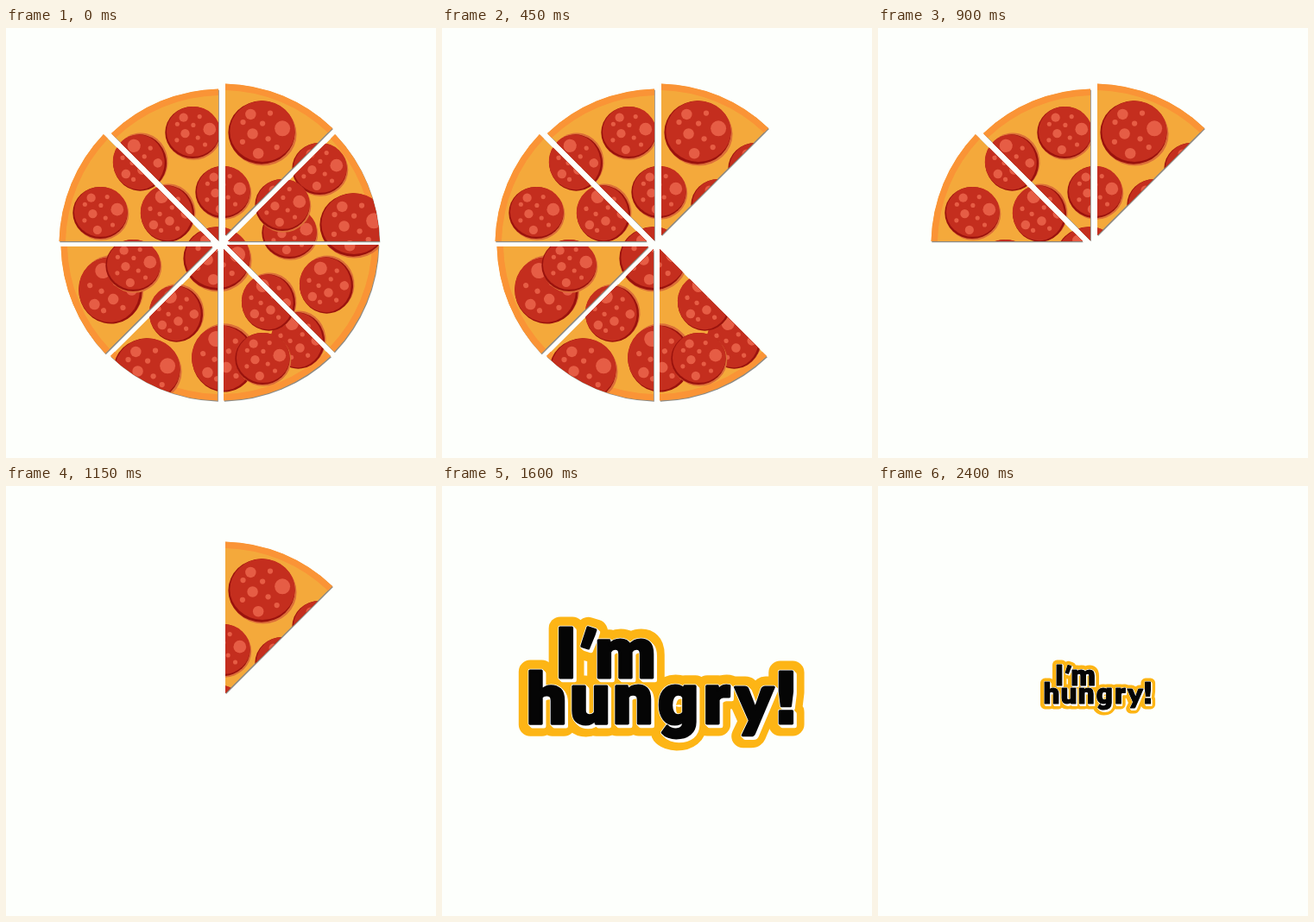
An HTML page for the animation above (2.45 s loop, 498 by 498 pixels).

```html
<!DOCTYPE html>
<html lang="en">
<head>
<meta charset="utf-8">
<title>I'm hungry!</title>
<style>
  html, body { margin: 0; width: 100%; height: 100%; overflow: hidden; background: #fdfffc; }
  svg { display: block; width: 100vw; height: 100vh; }
  text { font: 900 82px Roboto, "Noto Sans", sans-serif; }
  .straight { font-family: Lato, sans-serif; }
  .square { font-family: "DejaVu Sans", sans-serif; }
  #word { stroke-linejoin: round; }
</style>
</head>
<body>
<svg viewBox="0 0 498 498">
  <defs>
    <g id="pepperoni">
      <ellipse cx=".04" cy=".05" rx="1" ry=".94" fill="#dc6f38"/>
      <ellipse rx=".99" ry=".94" fill="#9a120d"/>
      <ellipse cx=".025" cy="-.035" rx=".965" ry=".905" fill="#c42e1e"/>
      <g id="spots" fill="#e65d45"></g>
    </g>
    <g id="toppings"></g>
    <g id="lines">
      <text x="131 148 177" y="221.5" rotate="0 18 0">I'm</text>
      <text x="98 148 198 250 303 340 380" y="275">hungr<tspan class="straight">y</tspan><tspan class="square">!</tspan></text>
    </g>
  </defs>
  <g id="pizza"></g>
  <g id="word">
    <use href="#lines" x=".5" y="1.5" fill="#fdb515" stroke="#fdb515" stroke-width="27"/>
    <g id="depth" fill="#fff" stroke="#fff" stroke-width="4.5"></g>
    <use href="#lines" fill="#050505" stroke="#050505" stroke-width="3"/>
  </g>
</svg>
<script>
const $ = id => document.getElementById(id);
const polar = (r, deg) => [r * Math.cos(deg * Math.PI / 180), r * Math.sin(deg * Math.PI / 180)];

// Spots on a unit pepperoni, spaced evenly around a ring
const SMALL = .08, MID = .16, BIG = .23;
function ring(radius, first, step, sizes) {
  return sizes.map((r, i) => {
    const [x, y] = polar(radius, first + step * i);
    return `<circle cx="${x}" cy="${y}" r="${r}"/>`;
  }).join('');
}
$('spots').innerHTML =
  ring(.63, -121, 55, [MID, SMALL, BIG, SMALL, MID, SMALL, SMALL]) +
  ring(.27, -84, 128, [SMALL, SMALL, MID]);

// Centres of the pepperoni by size and turn, lowest layer first
const layers = [
  { r: 39, turn: -100, at: [[252, 383], [121, 304]] },
  { r: 33, turn: -98, at: [[155, 156], [187, 215], [338, 362], [304, 318], [197, 331], [371, 298]] },
  { r: 32, turn: 0, at: [[216, 121], [109, 214], [251, 190], [363, 163], [328, 237], [320, 205], [297, 383], [147, 275]] },
  { r: 39, turn: 0, at: [[296, 121], [402, 228], [163, 396], [244, 267]] }
];
$('toppings').innerHTML = layers.map(({ r, turn, at }) => at.map(([x, y]) =>
  `<use href="#pepperoni" transform="translate(${x} ${y}) rotate(${turn}) scale(${r})"/>`
).join('')).join('');

// Tips of the eighths, clockwise in the order they go
const tips = [[257, 247], [256, 251], [252, 256], [245, 256], [239, 253], [237, 247], [246, 246], [254, 240]];
const SIDE = 175.5;
$('pizza').innerHTML = tips.map(([x, y], i) => {
  const corner = deg => {
    const [dx, dy] = polar(SIDE, deg);
    return `${x + dx} ${y + dy}`;
  };
  const rim = `M${corner(45 * i - 45)}A186 186 0 0 1 ${corner(45 * i)}`;
  const shape = `${rim}L${x} ${y}Z`;
  return `<g><clipPath id="cut${i}"><path d="${shape}"/></clipPath>
    <path d="${shape}" transform="translate(.8 1.2)" fill="#8c8a84"/>
    <g clip-path="url(#cut${i})">
      <path d="${shape}" fill="#f4a93b"/>
      <path d="${rim}" fill="none" stroke="#fa9436" stroke-width="15" stroke-linecap="square"/>
      <use href="#toppings"/>
    </g></g>`;
}).join('');
const pieces = [...$('pizza').children];

for (let d = 0; d <= 3; d++) {
  $('depth').innerHTML += `<use href="#lines" x="${d}" y="${d}"/>`;
}

const LOOP = 2450, STEP = 50, WORD_IN = 1250, WORD_OUT = 2050;
const clamp = v => Math.min(1, Math.max(0, v));
const goneAt = i => Math.min(250 + 150 * i, WORD_IN);

function wordScale(t) {
  const grow = 1 - (1 - clamp((t - WORD_IN) / 450)) ** 4;
  const shrink = clamp((t - WORD_OUT) / 398) ** 4;
  return grow - shrink;
}

function show(el, on) {
  el.setAttribute('visibility', on ? 'visible' : 'hidden');
}

function draw(ms) {
  const t = Math.floor((ms % LOOP) / STEP) * STEP;
  pieces.forEach((piece, i) => show(piece, t < goneAt(i)));
  const s = wordScale(t);
  show($('word'), s > 0);
  $('word').setAttribute('transform', `translate(254.8 237.2) scale(${s}) translate(-254.8 -237.2)`);
}

let start;
function tick(now) {
  start ??= now;
  draw(Math.max(0, now - start));
  requestAnimationFrame(tick);
}
draw(0);
requestAnimationFrame(tick);
</script>
</body>
</html>
```
